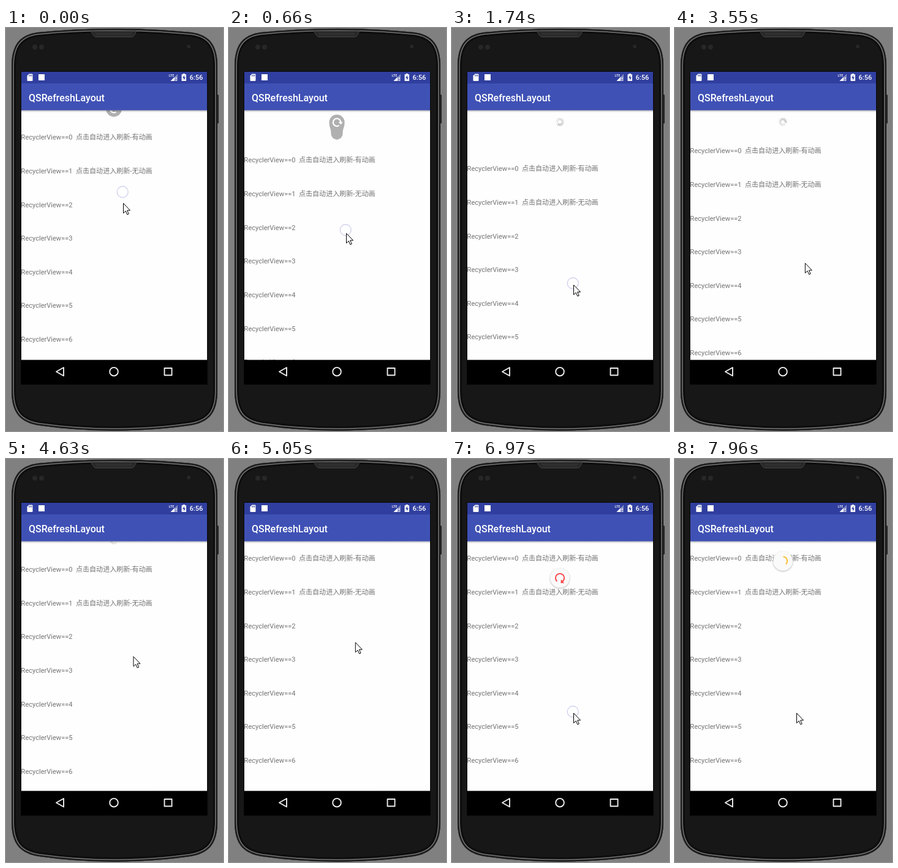
Write an HTML page that moves like this. It is 354 by 654 pixels and loops after 8000 ms.

```html
<!DOCTYPE html>
<html lang="zh">
<head>
<meta charset="utf-8">
<title>QSRefreshLayout</title>
<style>
html, body { margin: 0; width: 100%; height: 100%; overflow: hidden; background: #808080; }
svg { display: block; width: 354px; height: 654px; }
text { font-family: Roboto, "Noto Sans CJK SC", "Noto Sans CJK", sans-serif; white-space: pre; }
.row { font-size: 11.06px; fill: #747474; }
.bold { font-weight: 500; fill: #fff; }
</style>
</head>
<body>
<svg viewBox="0 0 354 654">
  <defs>
    <linearGradient id="shade" x2="0" y2="1">
      <stop offset="0" stop-color="#000" stop-opacity=".3"/><stop offset="1" stop-color="#000" stop-opacity="0"/>
    </linearGradient>
    <filter id="blur" x="-20%" y="-20%" width="140%" height="140%"><feGaussianBlur stdDeviation="1"/></filter>
    <path id="body" d="M9 62C9 28 22 11 52 7Q112 1 177 1T302 7C332 11 345 28 345 62V588C345 626 330 640 300 645Q240 653.500 177 653.500T54 645C24 640 9 626 9 588Z"/>
    <clipPath id="case"><use href="#body"/></clipPath>
    <clipPath id="page"><rect x="25" y="133.500" width="303" height="405.500"/></clipPath>
  </defs>

  <rect width="354" height="654" fill="#808080"/>
  <rect x="343" y="108" width="4" height="47" rx="1.500" fill="#2a2a2a"/>
  <g clip-path="url(#case)" fill="none">
    <use href="#body" fill="#171717"/>
    <use href="#body" stroke="#0d0d0d" stroke-width="14"/>
    <use href="#body" stroke="#747474" stroke-width="8"/>
    <use href="#body" stroke="#1c1c1c" stroke-width="5"/>
  </g>
  <path d="M138 5H213L209 12Q208 14.500 204 14.500H148Q144 14.500 143 12Z" fill="#272727" stroke="#474747"/>
  <path d="M146 8.500H206M147 11H205" stroke="#4a4a4a" stroke-dasharray="1 1"/>
  <g fill="#272727">
    <circle cx="47" cy="31" r="4"/><circle cx="58" cy="31" r="4"/><circle cx="298" cy="30" r="3"/>
  </g>
  <rect x="24" y="70" width="305" height="509" fill="#080808"/>
  <rect x="25" y="133" width="303" height="406" fill="#fefefe"/>

  <g clip-path="url(#page)">
    <g id="drop">
      <path id="blob" fill="#b0b0b0"/>
      <g fill="none" stroke="#fff" stroke-width="2.200">
        <path d="M3.500 5.200A6.200 6.200 0 1 1 6.200 0"/>
        <path d="M2.600 -.5H9.800L6.200 3.800Z" fill="#fff" stroke="none"/>
      </g>
    </g>
    <g id="spin"></g>
    <g id="list"></g>
    <g id="ball">
      <circle cy="1" r="16.300" fill="#000" opacity=".22" filter="url(#blur)"/>
      <circle r="15.800" fill="#fafafa"/>
      <g id="ring">
        <path id="arc" fill="none" stroke="currentColor" stroke-width="2"/>
        <path id="head" d="M-4 0H4L0 4.200Z" fill="currentColor"/>
      </g>
    </g>
  </g>
  <rect x="25" y="133" width="303" height="4" fill="url(#shade)"/>

  <rect x="25" y="71" width="303" height="19" fill="#303f9f"/>
  <rect x="25" y="90" width="303" height="43.500" fill="#3f51b5"/>
  <text class="bold" x="37" y="118.500" font-size="15.950">QSRefreshLayout</text>

  <g fill="#fff">
    <path d="M37.500 74.500H42.500Q43.500 74.500 43.500 75.500V85Q43.500 86 42.500 86H35.500Q34.500 86 34.500 85V77.500Z"/>
    <path d="M37.800 76V78.500M39.800 76V78.500M41.800 76V78.500" stroke="#303f9f"/>
    <rect x="53" y="75" width="10" height="10"/>
    <text class="bold" x="265.500" y="79" font-size="5.500">LTE</text>
    <path d="M280 74.500V86H268.500Z" opacity=".4"/>
    <path d="M275 79.500V86H268.500Z"/>
    <path d="M277.500 80V83M277.500 84.500V86" stroke="#fff" stroke-width="1.300"/>
    <path d="M288.500 74H292V75.200H294V86H286.500V75.200H288.500Z"/>
    <path d="M291 76.500L288 81.200H290V84.800L292.800 80H291Z" fill="#303f9f"/>
    <text class="bold" x="299.500" y="84.300" font-size="11.060">6:56</text>
  </g>

  <rect x="25" y="538.600" width="303" height="39.400" fill="#000"/>
  <g fill="none" stroke="#eee" stroke-width="1.900" stroke-linejoin="round">
    <path d="M94 551V564.500L82 557.750Z"/>
    <circle cx="176" cy="557.700" r="6.800"/>
    <rect x="258.500" y="552" width="12" height="11.500"/>
  </g>

  <circle id="touch" r="9" fill="#fff" fill-opacity=".6" stroke="#cfcfec" stroke-width="1.300"/>
  <path id="mouse" d="M.5 .5V16.500L4.200 13L6.800 18.800L9.200 17.800L6.700 12H11.500Z" fill="#fff" stroke="#000"/>
</svg>

<script>
const LOOP = 8000, STEP = 137.5, FIRST = 90;  // the screen refreshes once per STEP
const CX = 176, REST = 38;
const $ = id => document.getElementById(id);

// 0..1 progress between two moments
const ramp = (t, from, to) => Math.min(1, Math.max(0, (t - from) / (to - from)));
const out = p => Math.sin(p * Math.PI / 2);
const mix = (a, b, p) => a + (b - a) * p;

function add(parent, tag, attrs, text = '') {
  const el = parent.appendChild(document.createElementNS('http://www.w3.org/2000/svg', tag));
  for (const k in attrs) el.setAttribute(k, attrs[k]);
  el.textContent = text;
  return el;
}
const move = (id, x, y) => $(id).setAttribute('transform', `translate(${x} ${y})`);
const show = (id, on) => { $(id).style.display = on ? '' : 'none'; };

const HINTS = ['  点击自动进入刷新-有动画', '  点击自动进入刷新-无动画'];
for (let i = 0; i < 7; i++) {
  add($('list'), 'text', { class: 'row', x: 24.6, y: 165.2 + 54.65 * i }, `RecyclerView==${i}${HINTS[i] || ''}`);
}
const spokes = Array.from({ length: 12 }, (_, i) => add($('spin'), 'path',
  { d: 'M0 -3.400V-6.200', stroke: '#777', 'stroke-width': 1.2, 'stroke-linecap': 'round', transform: `rotate(${i * 30})` }));

// list offset: rubber-band drag, settle on the header, close
function pullAt(t) {
  const drag = 16 + 53 * (1 - Math.exp(-t / 530));
  return mix(drag, REST, out(ramp(t, 1890, 2190))) * (1 - out(ramp(t, 4450, 4950)));
}

// pointer: drag down, wander back up, drag down again
function mouseAt(t) {
  const x = 191 + 7 * ramp(t, 660, 1740) + 14 * ramp(t, 2600, 3300) - 14 * ramp(t, 3500, 6960);
  const y = 284 + 137 * ramp(t, 0, 1800) - 141 * ramp(t, 2810, 5350) + 132 * ramp(t, 5590, 6960);
  return [x, y];
}

function drawDrop(pull) {
  const s = Math.max(0, pull - REST);
  const r = 13 - s * 0.03, q = 13 - s * 0.23, y = 13 + s - q, m = y / 2;
  $('blob').setAttribute('d', `M${-r} 0A${r} ${r} 0 0 1 ${r} 0C${r} ${m} ${q} ${m} ${q} ${y}` +
    `A${q} ${q} 0 0 1 ${-q} ${y}C${-q} ${m} ${-r} ${m} ${-r} 0Z`);
  move('drop', CX, 115 + Math.min(pull, REST));
}

function drawSpin(t, pull) {
  const lead = Math.floor(t / 90);
  spokes.forEach((el, i) => { el.style.opacity = 0.75 - 0.05 * ((lead - i + 12) % 12); });
  move('spin', CX, 114.5 + Math.min(pull, REST));
}

function drawBall(t) {
  const drag = ramp(t, 5590, 6900), close = ramp(t, 7120, 7690), open = ramp(t, 7690, 7950);
  move('ball', CX, mix(115, 193, out(drag)) - 27.5 * out(ramp(t, 7120, 7400)));

  const r = 7.1;
  const tail = 60 + 70 * drag + 490 * close + 15 * open;
  const tip = 70 + 340 * drag + 220 * close + 150 * open;
  const point = a => [r * Math.cos(a * Math.PI / 180), r * Math.sin(a * Math.PI / 180)];
  $('arc').setAttribute('d', `M${point(tail)}A${r} ${r} 0 ${+(tip - tail > 180)} 1 ${point(tip)}`);
  $('head').setAttribute('transform', `translate(${point(tip)}) rotate(${tip})`);
  $('ring').style.opacity = mix(0.3, 1, drag);
  $('ring').style.color = open > 0 ? '#fbbc2e' : '#f9474b';
  show('head', close < 0.5);
}

function draw(t) {
  const pull = pullAt(t), [x, y] = mouseAt(t);
  move('list', 0, pull);
  drawDrop(pull);
  drawSpin(t, pull);
  drawBall(t);
  move('mouse', x, y);
  move('touch', x - 0.8, y - 2 - 16 * Math.exp(-t / 380));

  show('drop', t < 1470);
  show('spin', t >= 1470 && t < 4900);
  show('ball', t >= 5590);
  show('touch', t < 1950 || (t >= 5550 && t < 7200));
}

function loop() {
  const now = performance.now() % LOOP;
  draw(Math.max(0, FIRST + Math.floor((now - FIRST) / STEP) * STEP));
  requestAnimationFrame(loop);
}
loop();
</script>
</body>
</html>
```
